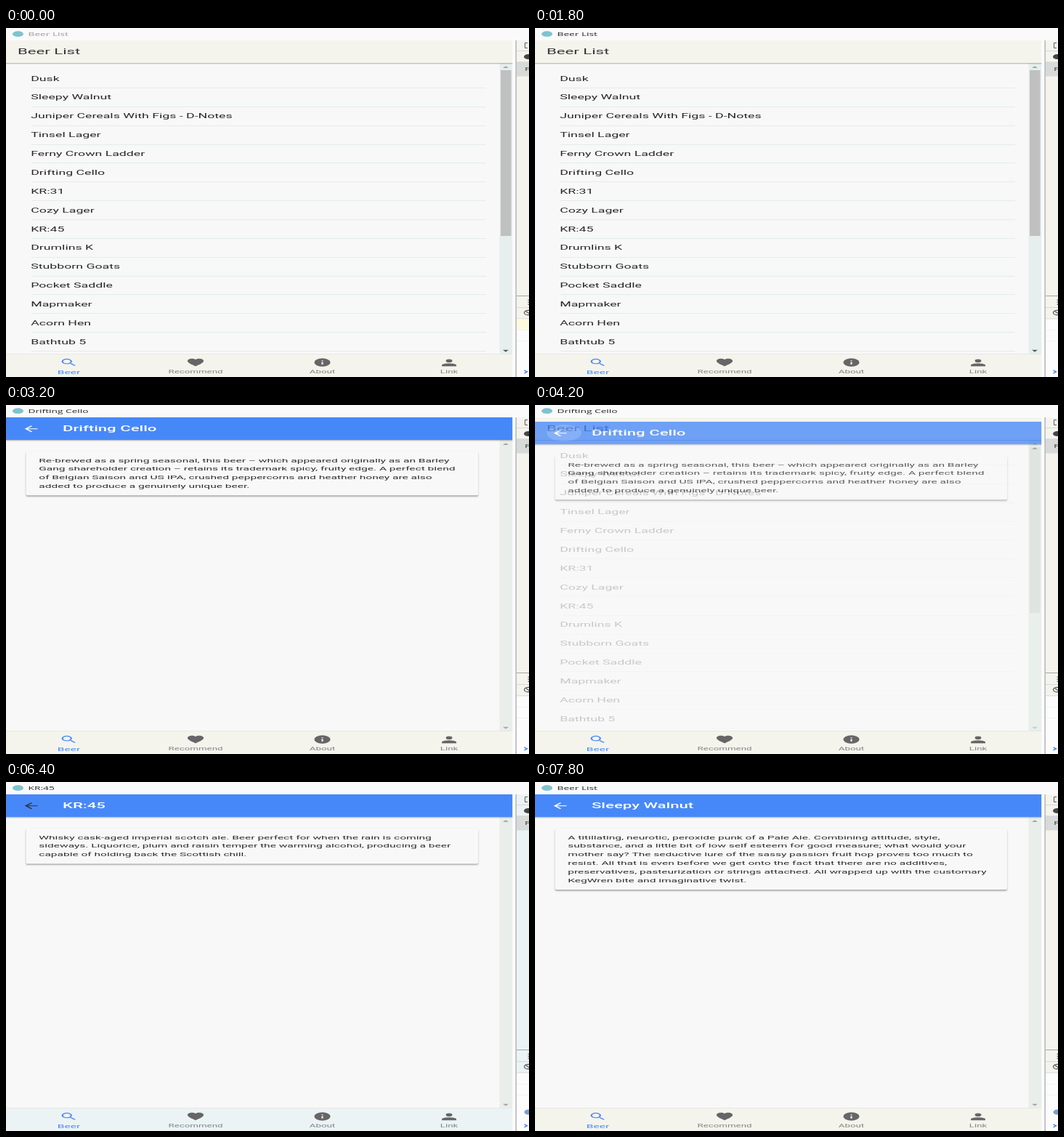
Animation of 720 by 480 pixels, one loop 8000 ms. Source, as an HTML page with a canvas:

```html
<!DOCTYPE html>
<html lang="en">
<head>
<meta charset="utf-8">
<title>Beer List</title>
<style>
html, body { margin: 0; width: 100%; height: 100%; overflow: hidden; background: #f8f8f8; }
canvas { display: block; width: 100vw; height: 100vh; }
</style>
</head>
<body>
<canvas id="stage" width="720" height="480"></canvas>
<script>
const W = 720, H = 480, LOOP = 8000, STEP = 200;
const SX = 1.107, SY = 0.57;          // the screen is shown wider than tall
const APP_W = 697.5, TOP = 17, BAR = 48, TABS = 448.5, ROW = 25.86;
const BLUE = '#4788f9', PAGE = '#f8f8f8', INK = '#262626';

const beers = [
  'Dusk', 'Sleepy Walnut', 'Juniper Cereals With Figs - D-Notes', 'Tinsel Lager',
  'Ferny Crown Ladder', 'Drifting Cello', 'KR:31', 'Cozy Lager', 'KR:45', 'Drumlins K',
  'Stubborn Goats', 'Pocket Saddle', 'Mapmaker', 'Acorn Hen', 'Bathtub 5',
  'Plaintive Porter', 'KR:42', 'Kitchen Bell – India Pale Ale',
  'Please Greet Aunt Tinne-Varin', 'Tinkerer', 'Lute Bier', 'Gentle Baker (w/ Tollander)'
];

// Each visit: when the detail page enters, when back is pressed, when it starts to leave.
const visits = [
  { name: 'Drifting Cello', enter: 2215, press: 4148, leave: 4148, lines: [
    'Re-brewed as a spring seasonal, this beer – which appeared originally as an Barley',
    'Gang shareholder creation – retains its trademark spicy, fruity edge. A perfect blend',
    'of Belgian Saison and US IPA, crushed peppercorns and heather honey are also',
    'added to produce a genuinely unique beer.'] },
  { name: 'KR:45', enter: 5015, press: 6400, leave: 6450, lines: [
    'Whisky cask-aged imperial scotch ale. Beer perfect for when the rain is coming',
    'sideways. Liquorice, plum and raisin temper the warming alcohol, producing a beer',
    'capable of holding back the Scottish chill.'] },
  { name: 'Sleepy Walnut', enter: 7515, press: LOOP, leave: LOOP, lines: [
    'A titillating, neurotic, peroxide punk of a Pale Ale. Combining attitude, style,',
    'substance, and a little bit of low self esteem for good measure; what would your',
    'mother say? The seductive lure of the sassy passion fruit hop proves too much to',
    'resist. All that is even before we get onto the fact that there are no additives,',
    'preservatives, pasteurization or strings attached. All wrapped up with the customary',
    'KegWren bite and imaginative twist.'] }
];

const icons = {
  back: 'M20 11H7.83l5.59-5.59L12 4l-8 8 8 8 1.41-1.41L7.83 13H20z',
  search: 'M15.5 14h-.79l-.28-.27A6.47 6.47 0 0 0 16 9.5 6.5 6.5 0 1 0 9.5 16c1.61 0 3.09-.59 4.23-1.57l.27.28v.79l5 4.99L20.49 19zM9.5 14a4.5 4.5 0 1 1 0-9 4.5 4.5 0 0 1 0 9z',
  heart: 'M12 21.35l-1.45-1.32C5.4 15.36 2 12.28 2 8.5 2 5.42 4.42 3 7.5 3c1.74 0 3.41.81 4.5 2.09C13.09 3.81 14.76 3 16.5 3 19.58 3 22 5.42 22 8.5c0 3.78-3.4 6.86-8.55 11.54z',
  info: 'M12 2a10 10 0 1 0 0 20 10 10 0 0 0 0-20zM13 17h-2v-6h2zM13 9h-2V7h2z',
  person: 'M12 12a4 4 0 1 0 0-8 4 4 0 0 0 0 8zM12 14c-3 0-9 1.4-9 4.2V21h18v-2.8c0-2.8-6-4.2-9-4.2z'
};
for (const k in icons) icons[k] = new Path2D(icons[k]);

const screen = document.getElementById('stage').getContext('2d');
const layerCanvas = document.createElement('canvas');
layerCanvas.width = W;
layerCanvas.height = H;
const layer = layerCanvas.getContext('2d');
let ctx = screen;

function rect(x, y, w, h, color) {
  ctx.fillStyle = color;
  ctx.fillRect(x, y, w, h);
}

function oval(x, y, rx, ry, color) {
  ctx.fillStyle = color;
  ctx.beginPath();
  ctx.ellipse(x, y, rx, ry, 0, 0, Math.PI * 2);
  ctx.fill();
}

// y is the middle of the capitals
function text(s, x, y, size, color, { weight = 400, align = 'left', font = 'Roboto' } = {}) {
  ctx.save();
  ctx.translate(x, y);
  ctx.scale(SX, SY);
  ctx.font = `${weight} ${size}px "${font}", sans-serif`;
  ctx.textAlign = align;
  ctx.fillStyle = color;
  ctx.fillText(s, 0, size * 0.355);
  ctx.restore();
}

function icon(name, x, y, color) {
  ctx.save();
  ctx.translate(x, y);
  ctx.scale(SX, SY);
  ctx.translate(-12, -12);
  ctx.fillStyle = color;
  ctx.fill(icons[name], 'evenodd');
  ctx.restore();
}

function arrow(y, dir, color) {
  ctx.fillStyle = color;
  ctx.beginPath();
  ctx.moveTo(684, y - dir * 1.2);
  ctx.lineTo(692, y - dir * 1.2);
  ctx.lineTo(688, y + dir * 1.4);
  ctx.fill();
}

function scrollbar(track, up, down) {
  rect(679.5, BAR, 18, TABS - BAR, track);
  arrow(53.7, -1, up);
  arrow(444, 1, down);
}

function barShadow() {
  const g = ctx.createLinearGradient(0, BAR, 0, BAR + 2.5);
  g.addColorStop(0, 'rgba(0,0,0,.26)');
  g.addColorStop(1, 'rgba(0,0,0,0)');
  rect(0, BAR, APP_W, 3, g);
}

function drawList(scroll, chrome) {
  rect(0, TOP, APP_W, TABS - TOP, PAGE);
  ctx.save();
  ctx.beginPath();
  ctx.rect(0, BAR, APP_W, TABS - BAR);
  ctx.clip();
  beers.forEach((name, i) => {
    const y = 69.4 + i * ROW - scroll;
    text(name, 34.2, y, 16, INK);
    rect(35, Math.round(y + 12.6), 626, 1, '#e0eeec');
  });
  scrollbar('#e6efee', scroll > 0 ? '#505050' : '#a3a3a3', '#505050');
  rect(681, 58 + scroll * 0.564, 14.5, 228, '#c0c0c0');
  ctx.restore();
  rect(0, TOP, APP_W, BAR - TOP, chrome);
  barShadow();
  text('Beer List', 16, 32.2, 20, '#333');
}

function drawDetail({ name, lines }, pressed, ripple) {
  rect(0, TOP, APP_W, H - TOP, PAGE);
  scrollbar('#eaeeeb', '#a3a3a3', '#a3a3a3');

  const bottom = 75.7 + (lines.length - 1) * 11.88 + 13;
  ctx.save();
  ctx.shadowColor = 'rgba(0,0,0,.32)';
  ctx.shadowBlur = 2;
  ctx.shadowOffsetY = 1.6;
  ctx.fillStyle = PAGE;
  ctx.beginPath();
  ctx.roundRect(27.5, 64, 622.5, bottom - 64, 2);
  ctx.fill();
  ctx.restore();
  lines.forEach((line, i) => text(line, 45.3, 75.7 + i * 11.88, 14, '#2c2c2c'));

  rect(0, TOP, APP_W, BAR - TOP, BLUE);
  barShadow();
  if (ripple) oval(40, 32.5, 24, 11.5, 'rgba(255,255,255,.16)');
  icon('back', 34.6, 32.7, pressed ? '#333' : '#fff');
  text(name, 78, 32.2, 20, '#fff', { weight: 500 });
}

function drawTabs(chrome) {
  rect(0, TABS, APP_W, H - TABS, chrome);
  rect(0, TABS - 0.5, APP_W, 1, '#e6e8e4');
  const tabs = [['search', 'Beer'], ['heart', 'Recommend'], ['info', 'About'], ['person', 'Link']];
  tabs.forEach(([name, label], i) => {
    const x = 86.5 + i * 174.5;
    icon(name, x, 460, i ? '#666' : BLUE);
    text(label, x, 472.7, i ? 12 : 14, i ? '#858585' : BLUE, { align: 'center' });
  });
}

function drawTools(t, chrome) {
  rect(APP_W, TOP, W - APP_W, H - TOP, '#fcfcfc');
  rect(703, TOP, 17, 383, chrome);
  rect(703, 47, 17, 19.5, '#d8dada');
  for (const y of [31, 46.5, 384, 399.5]) rect(703, y, 17, 0.8, '#d2d2d2');
  rect(703, 368, 17, 1, '#a4a4a8');
  if (t < 1800) rect(703, 400, 17, 15, '#fcf9df');
  rect(703, 415, 17, 0.6, '#efefef');
  rect(703, 430, 17, 0.6, '#efefef');
  rect(701.5, TOP, 1.2, H - TOP, '#a2a2a8');

  ctx.strokeStyle = '#5a5a5a';
  ctx.lineWidth = 1;
  ctx.beginPath();
  ctx.moveTo(718, 20.5);
  ctx.lineTo(714.5, 20.5);
  ctx.lineTo(714.5, 27.5);
  ctx.lineTo(718, 27.5);
  ctx.stroke();
  oval(719, 39.5, 6, 3.6, '#454545');
  text('F', 714.3, 57, 12, '#444');
  for (const y of [373.6, 376.6, 379.6]) rect(718.6, y, 1.4, 1.2, '#555');
  ctx.lineWidth = 1.3;
  ctx.beginPath();
  ctx.ellipse(718.5, 391.5, 5, 3.2, 0, 0, Math.PI * 2);
  ctx.moveTo(715, 389.3);
  ctx.lineTo(722, 393.8);
  ctx.stroke();
  if (t >= 4600) oval(718.5, 454, 5, 3.6, '#7d9fd0');
  ctx.strokeStyle = '#3f7fe0';
  ctx.beginPath();
  ctx.moveTo(713.5, 470.8);
  ctx.lineTo(717.5, 472.8);
  ctx.lineTo(713.5, 474.8);
  ctx.stroke();
}

function scrollAt(t) {
  if (t < 800 || t >= 1600) return 0;
  if (t < 1000) return 75;
  return t < 1400 ? 168.8 : 85;
}

// How much of the detail page is present, 0 to 1
function presence(v, t) {
  if (t <= v.enter || t >= v.leave + 200) return 0;
  if (t > v.leave) return 1 - (t - v.leave) / 200;
  return 1 - Math.pow(1 - Math.min(1, (t - v.enter) / 280), 3);
}

function render(t) {
  const chrome = t >= 6200 && t < 6800 ? '#ebf3f5' : '#f4f4ed';
  ctx = screen;
  rect(0, 0, W, H, PAGE);
  drawList(scrollAt(t), chrome);

  const visit = visits.find(v => presence(v, t) > 0);
  let title = 'Beer List';
  if (visit) {
    const p = presence(visit, t);
    const leaving = t > visit.leave;
    if (t > visit.enter + 300) title = visit.name;
    ctx = layer;
    drawDetail(visit, t >= visit.press && !leaving, leaving);
    ctx = screen;
    ctx.save();
    ctx.beginPath();
    ctx.rect(0, TOP, APP_W, TABS - TOP);
    ctx.clip();
    ctx.globalAlpha = Math.min(1, p * 1.05);
    const shift = (1 - p) * 40 * SY;
    ctx.drawImage(layerCanvas, 0, TOP, W, H - TOP, 0, TOP + shift, W, H - TOP);
    ctx.restore();
  }

  drawTabs(chrome);
  drawTools(t, chrome);
  rect(0, 0, W, TOP, '#fafafa');
  oval(16.5, 8.2, 7.5, 3.9, '#7fc3cf');
  text(title, 30.5, 8.3, 12.4, t < 1600 ? '#999' : '#222', { font: 'Open Sans' });
}

function tick() {
  const t = performance.now() % LOOP;
  render(Math.floor(t / STEP) * STEP);
  requestAnimationFrame(tick);
}
tick();
</script>
</body>
</html>
```
